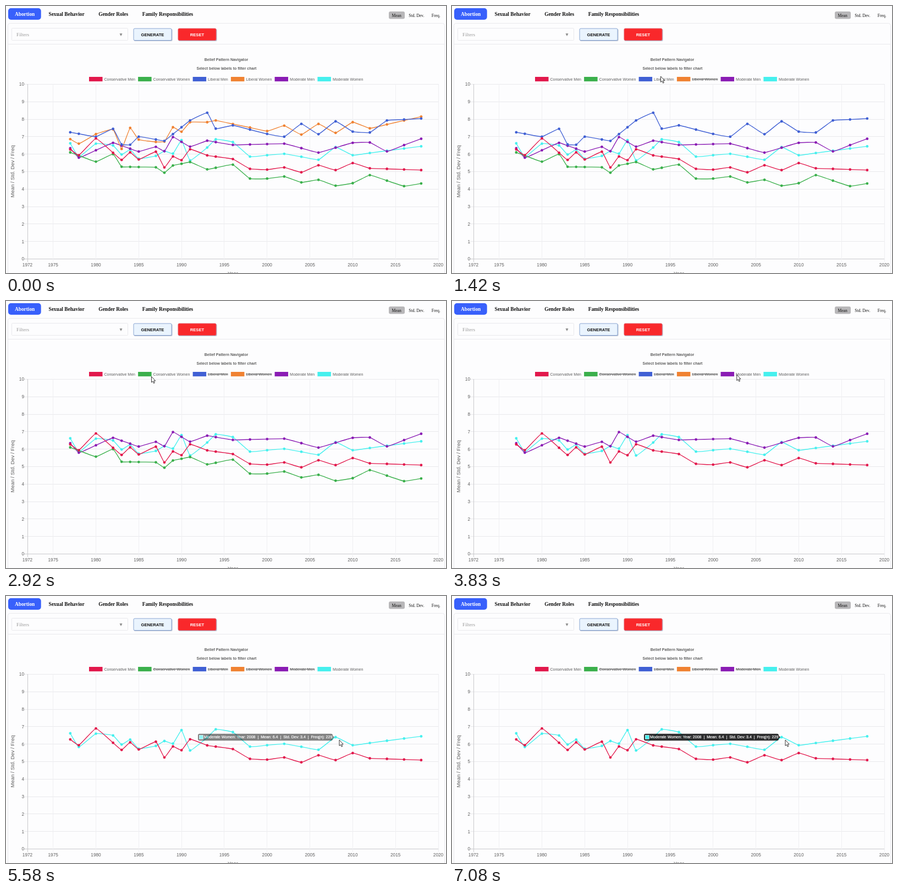
Animation of 800x486 px, one loop 7.16 s. Source, as an HTML page:

```html
<!DOCTYPE html>
<html lang="en">
<head>
<meta charset="utf-8">
<title>Attitude chart</title>
<style>
  html, body { margin: 0; width: 100%; height: 100%; overflow: hidden; background: #fdfdfe; }
  svg { display: block; width: 800px; height: 486px; }
  text { white-space: pre; font-family: "Liberation Sans", Arial, sans-serif; fill: #5e5e5e; }
  .serif { font-family: "Liberation Serif", "Times New Roman", serif; fill: #111; }
  .bold { font-weight: bold; }
</style>
</head>
<body>
<svg id="stage" viewBox="0 0 800 486"></svg>
<script>
const LOOP = 7160;
const stage = document.getElementById('stage');

function add(tag, attrs, parent = stage) {
  const el = document.createElementNS('http://www.w3.org/2000/svg', tag);
  for (const k in attrs) el.setAttribute(k, attrs[k]);
  parent.appendChild(el);
  return el;
}

function label(str, x, y, size, attrs = {}, parent = stage) {
  const el = add('text', { x, y, 'font-size': size, ...attrs }, parent);
  el.textContent = str;
  return el;
}

const box = (x, y, width, height, rx, attrs, parent) =>
  add('rect', { x, y, width, height, rx, ...attrs }, parent);
const line = (x1, y1, x2, y2, stroke, attrs = {}, parent) =>
  add('line', { x1, y1, x2, y2, stroke, ...attrs }, parent);
const clamp = u => Math.min(1, Math.max(0, u));
const mix = (a, b, u) => a + (b - a) * u;
const middle = { 'text-anchor': 'middle' };

// Lays labels out in a row with a fixed gap.
function row(names, x, y, size, gap, attrs) {
  for (const name of names) x += label(name, x, y, size, attrs).getComputedTextLength() + gap;
}

// Header
box(4, 4, 59.7, 21, 5, { fill: '#3860fb' });
label('Abortion', 16, 18, 9.33, { class: 'serif bold', style: 'fill:#fff' });
row(['Sexual Behavior', 'Gender Roles', 'Family Responsibilities'], 77.5, 18, 9.33, 25.6, { class: 'serif bold' });
box(696, 10, 29, 13.5, 3, { fill: '#b8b7b9' });
row(['Mean', 'Std. Dev.', 'Freq.'], 701.5, 19.5, 7.6, 13.5, { class: 'serif' });

// Panel and filter bar
const frame = { fill: 'none', stroke: '#e9e9ed' };
box(3.5, 31.5, 794, 480, 4, frame);
line(4, 69.5, 797, 69.5, '#e9e9ed');
box(10.5, 40.5, 211, 22, 1, frame);
label('Filters', 19, 55, 9, { class: 'serif', style: 'fill:#999' });
add('path', { d: 'M206.5 50h5l-2.5 5z', fill: '#8d8d8d' });

function button(str, x, fill, edge, color) {
  box(x + 1, 42, 70, 22, 2, { fill: '#98a5c2', opacity: .7 });
  box(x + .5, 41, 69, 21.5, 2, { fill, stroke: edge });
  label(str, x + 35, 54.5, 7.65, { ...middle, class: 'bold', style: 'fill:' + color });
}
button('GENERATE', 231.5, '#eaf4fe', '#8ba6d2', '#111');
button('RESET', 312.5, '#f9282b', '#e55a66', '#fff');

// Chart titles and axes
label('Belief Pattern Navigator', 400.5, 99.5, 7, { ...middle, class: 'bold' });
label('Select below labels to filter chart', 401, 115.7, 7, { ...middle, class: 'bold' });

const px = year => 39 + (year - 1972) * 15.5625;
const py = value => 460.5 - value * 31.8;
const snap = v => Math.floor(v) + .5;

for (let v = 0; v <= 10; v++) {
  line(33, snap(py(v)), 786, snap(py(v)), v ? '#e9e9ec' : '#c9c9cc');
  label(v, 33, py(v) + 2.8, 8.25, { 'text-anchor': 'end' });
}
function yearMark(year, stroke) {
  const x = snap(px(year));
  line(x, 142, x, 466, stroke);
  label(year, px(year), 474, 8.25, middle);
}
yearMark(1972, '#c9c9cc');
for (let year = 1975; year <= 2020; year += 5) yearMark(year, '#efeff2');
label('Mean / Std. Dev / Freq', 0, 0, 9.45, { ...middle, transform: 'translate(15 301) rotate(-90)' });
label('Year', 412.5, 490, 9.4, middle);

// Survey years: most of the early ones, then every second year
const years = [];
for (let y = 1977; y <= 2018; y++) {
  if (y < 1995 ? ![1979, 1981, 1986, 1992].includes(y) : y % 2 === 0) years.push(y);
}
const within = (year, from, to) => year >= from && year <= to;

// Straight runs between the given keys, with a zigzag in two spans of years.
function fill(keys, early, late) {
  return years.map((year, i) => {
    let a = i, b = i;
    while (!(a in keys)) a--;
    while (!(b in keys)) b++;
    const u = a === b ? 0 : (year - years[a]) / (years[b] - years[a]);
    const swing = within(year, 1982, 1991) ? early : within(year, 2002, 2010) ? late : 0;
    return mix(keys[a], keys[b], u) + (i % 2 ? swing : -swing);
  });
}

function curve(pts, tension = .1) {
  const controls = pts.map((p, i) => {
    const a = pts[i - 1] || p, b = pts[i + 1] || p;
    const da = Math.hypot(p[0] - a[0], p[1] - a[1]);
    const db = Math.hypot(b[0] - p[0], b[1] - p[1]);
    const at = k => [p[0] + k * (b[0] - a[0]), p[1] + k * (b[1] - a[1])];
    return [at(-tension * da / (da + db)), at(tension * db / (da + db))];
  });
  return pts.map((p, i) => i
    ? `C${controls[i - 1][1]} ${controls[i][0]} ${p}`
    : `M${p}`).join('');
}

const plot = add('g', {});
const shown = {};
let legendX = 151;

// Earlier series lie above later ones.
function series(name, color, early, late, keys) {
  const g = add('g', {});
  plot.prepend(g);
  const pts = fill(keys, early, late).map((v, i) => [px(years[i]), py(v)]);
  add('path', { d: curve(pts), fill: 'none', stroke: color, 'stroke-width': 1.35 }, g);
  for (const [cx, cy] of pts) add('circle', { cx, cy, r: 2.4, fill: color }, g);

  box(legendX, 129, 24.5, 8.2, 0, { fill: color });
  const x = legendX + 27.5;
  const width = label(name, x, 135.6, 7).getComputedTextLength();
  const strike = line(x, 133.2, x + width, 133.2, '#666', { 'stroke-width': 1.2 });
  shown[name] = { g, strike };
  legendX = x + width + 5.2;
}

series('Conservative Men', '#e2184c', .21, .17,
  [6.27, 5.94, 6.9, 5.87, , , , 5.93, 5.45, , , 6.07, , , 5.72, 5.16, , 5.07, , , , 5.32, 5.19, , , 5.09]);
series('Conservative Women', '#3bb04c', 0, .12,
  [6.1, , 5.57, 6, 5.28, , , 5.25, 4.94, 5.35, , 5.55, 5.13, , 5.4, 4.6, , 4.6, , , , 4.22, 4.8, , 4.17, 4.32]);
series('Liberal Men', '#4060d4', 0, -.33,
  [7.25, , 7, 7.45, 6.56, 6.54, 7, , 6.76, , , 7.93, 8.37, 7.46, 7.65, , 7.16, 7.33, , , , 7.62, 7.24, 7.93, , 8.04]);
series('Liberal Women', '#f08232', .2, .28,
  [6.86, 6.6, 7.15, 7.22, 6.5, 7.3, , 6.5, , 7.34, , 7.63, , 7.93, , , 7.32, 7.35, , , , 7.55, 7.48, , , 8.15]);
series('Moderate Men', '#8a1cb4', 0, 0,
  [6.34, 5.8, , 6.65, , , 6.15, 6.42, 6.17, 6.98, , 6.43, 6.77, , 6.53, , , 6.6, , 6.09, , 6.65, 6.67, 6.16, , 6.88]);
series('Moderate Women', '#46f0ee', .2, 0,
  [6.62, 5.84, 6.6, 6.3, , , , 5.7, 6.38, 5.83, 7, 5.44, , 6.85, 6.69, 5.86, , 6.02, , 5.68, 6.4, 5.94, , , , 6.45]);

// Tooltip
const tip = add('g', {});
add('path', {
  d: 'M352 250.7H591a3 3 0 0 1 3 3V254.2L597 257L594 259.8V260.3a3 3 0 0 1-3 3H352a3 3 0 0 1-3-3V253.7a3 3 0 0 1 3-3z',
  fill: '#000', 'fill-opacity': .82
}, tip);
box(351.3, 253.4, 7, 7, 0, { fill: '#46f0ee', stroke: '#fff', 'stroke-width': .6 }, tip);
label('Moderate Women: Year: 2008  |  Mean: 6.4  |  Std. Dev: 3.4  |  Freq(n): 229',
  360, 259.4, 7.05, { style: 'fill:#fff;stroke:#fff;stroke-width:.2' }, tip);

// Pointer
const cursor = add('path', {
  d: 'M0 0V10.6L2.4 8.5L4.1 12.3L5.8 11.5L4.2 7.8H7.2Z',
  fill: '#fff', stroke: '#222', 'stroke-width': .9, 'stroke-linejoin': 'round'
});

// Each stop may click a legend entry halfway through its stay.
const stops = [
  { from: 750, to: 750, x: 470, y: 490 },
  { from: 960, to: 1200, x: 431, y: 138, click: 'Liberal Women' },
  { from: 1420, to: 1900, x: 379.5, y: 128, click: 'Liberal Men' },
  { from: 2800, to: 3300, x: 264.5, y: 137.5, click: 'Conservative Women' },
  { from: 3910, to: 4500, x: 530, y: 134, click: 'Moderate Men' },
  { from: 4830, to: 4830, x: 549.5, y: 185.5 },
  { from: 5580, to: LOOP, x: 606, y: 262 }
];

function pointerAt(t) {
  const i = Math.max(1, stops.findIndex(s => s.to > t));
  const a = stops[i - 1], b = stops[i];
  const u = clamp((t - a.to) / (b.from - a.to));
  const e = u * u * (3 - 2 * u);
  return [mix(a.x, b.x, e), mix(a.y, b.y, e)];
}

const show = (el, on) => el.setAttribute('visibility', on ? 'visible' : 'hidden');

function draw(t) {
  for (const name in shown) {
    const stop = stops.find(s => s.click === name);
    const hidden = Boolean(stop) && t >= (stop.from + stop.to) / 2;
    show(shown[name].g, !hidden);
    show(shown[name].strike, hidden);
  }
  tip.setAttribute('opacity', 1 - (1 - clamp((t - 5500) / 400)) ** 4);
  show(cursor, t >= stops[0].from);
  cursor.setAttribute('transform', `translate(${pointerAt(t)})`);
}

const start = performance.now();
function tick(now) {
  draw(Math.max(0, now - start) % LOOP);
  requestAnimationFrame(tick);
}
draw(0);
requestAnimationFrame(tick);
</script>
</body>
</html>
```
